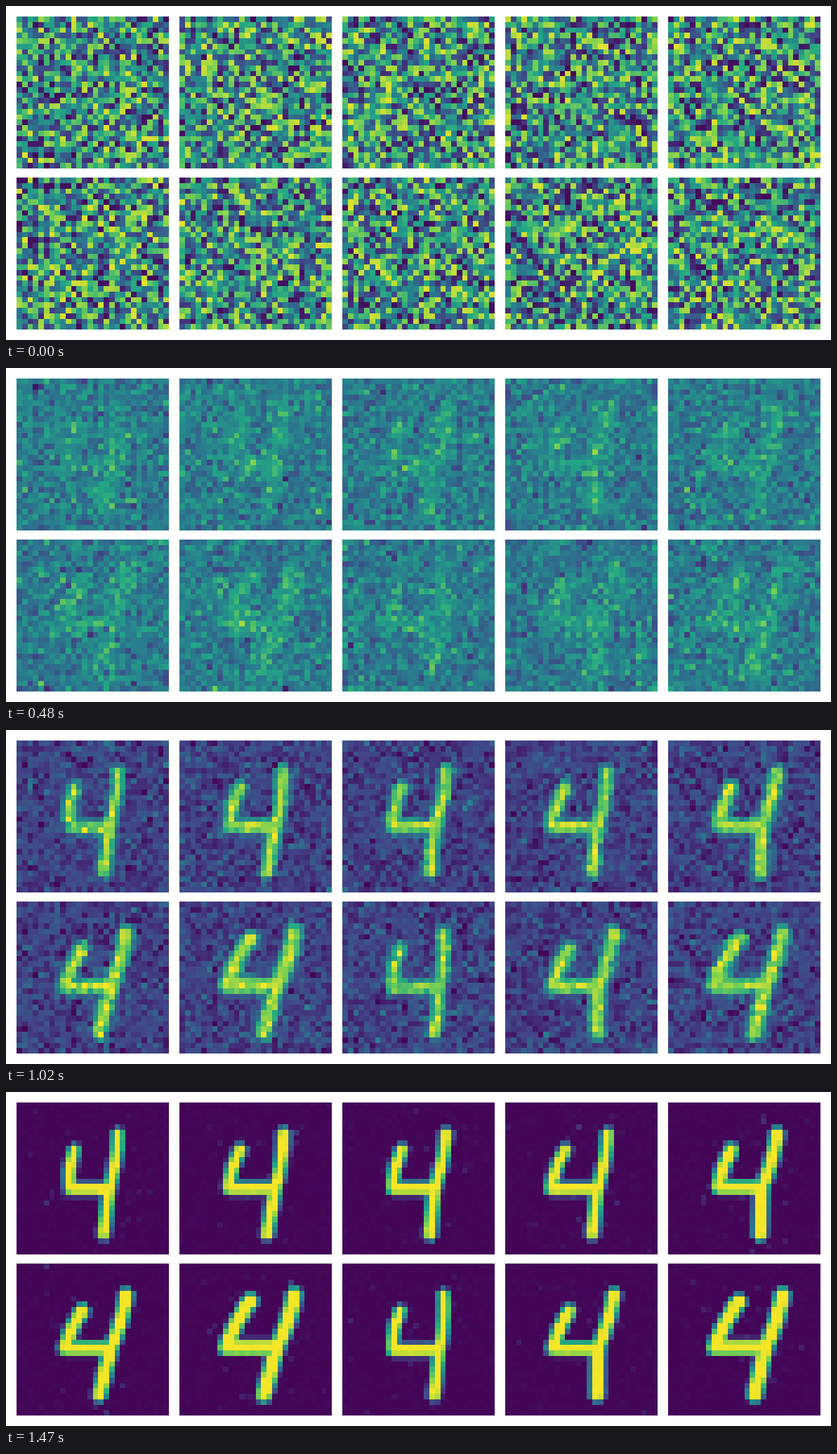
An HTML page with a canvas that plays this animation: 1175 by 477 pixels, repeating every 1.5 s.

```html
<!DOCTYPE html>
<html>
<head>
<meta charset="utf-8">
<style>
html, body { margin: 0; width: 100%; height: 100%; overflow: hidden; background: #fff; }
canvas { display: block; }
</style>
</head>
<body>
<canvas id="stage" width="1175" height="477"></canvas>
<script>
const N = 28, CELLS = N * N, STEPS = 50, STEP_MS = 30;
const ctx = document.getElementById('stage').getContext('2d');
ctx.imageSmoothingEnabled = false;

const tile = document.createElement('canvas');
tile.width = tile.height = N;
const tileCtx = tile.getContext('2d');
const pixels = tileCtx.createImageData(N, N);

const clamp = v => Math.max(0, Math.min(1, v));
const mix = (a, b, u) => a + (b - a) * u;
const mixPt = (p, q, u) => [mix(p[0], q[0], u), mix(p[1], q[1], u)];

// Viridis colour scale
const stops = ['440154', '414487', '2a788e', '22a884', '7ad151', 'fde725']
  .map(h => [0, 2, 4].map(i => parseInt(h.slice(i, i + 2), 16)));
function viridis(v) {
  const p = v * (stops.length - 1), k = Math.min(stops.length - 2, Math.floor(p));
  return stops[k].map((c, j) => Math.round(mix(c, stops[k + 1][j], p - k)));
}
const colors = Array.from({ length: 256 }, (_, i) => viridis(i / 255));

let seed = 20417;
function rand() {
  seed = (seed + 0x6D2B79F5) | 0;
  let t = Math.imul(seed ^ seed >>> 15, 1 | seed);
  t = t + Math.imul(t ^ t >>> 7, 61 | t) ^ t;
  return ((t ^ t >>> 14) >>> 0) / 4294967296;
}
const gauss = () => Math.sqrt(-2 * Math.log(1 - rand())) * Math.cos(2 * Math.PI * rand());

function segDist(x, y, [[ax, ay], [bx, by]]) {
  const dx = bx - ax, dy = by - ay;
  const u = clamp(((x - ax) * dx + (y - ay) * dy) / (dx * dx + dy * dy));
  return Math.hypot(x - ax - u * dx, y - ay - u * dy);
}

// Bowed stroke from p to q, its middle pushed sideways
function bow(p, q, push, parts = 6) {
  const point = u => {
    const [x, y] = mixPt(p, q, u);
    return [x + 4 * push * u * (1 - u), y];
  };
  return Array.from({ length: parts }, (_, i) => [point(i / parts), point((i + 1) / parts)]);
}

// Signed depth inside the strokes of a handwritten 4, for every cell;
// wider leaning ones are bolder and have a higher bar
function four([hook, corner, top, cross, foot]) {
  const lean = top - 18.7;
  const half = 1.12 + 0.13 * lean, bar = 15.9 - 0.2 * lean;
  const crossing = [cross, bar];
  const lines = [
    ...bow([hook, 8.8 - 2 * Math.max(0, hook - 12)], [corner, bar], -0.4),
    [[corner, bar], crossing],
    ...bow([top, 5.8], crossing, 0.35),
    [crossing, [foot, 24.1]]
  ];
  return Float32Array.from({ length: CELLS }, (_, i) => {
    const x = i % N + 0.5, y = Math.floor(i / N) + 0.5;
    return half - Math.min(...lines.map(l => segDist(x, y, l)));
  });
}

// Columns of hook, corner, stem top, crossing and foot
const fours = [
  [10.6, 9.9, 18.6, 17.0, 16.0],
  [11.1, 9.1, 19.1, 17.6, 16.1],
  [10.9, 9.3, 19.0, 16.9, 16.1],
  [11.0, 8.4, 18.8, 16.9, 16.0],
  [11.6, 9.3, 20.0, 17.2, 16.9],
  [12.0, 9.0, 20.1, 17.3, 15.2],
  [13.0, 8.6, 21.1, 17.9, 15.5],
  [10.6, 9.3, 18.6, 17.8, 16.9],
  [11.7, 8.9, 19.9, 17.0, 16.9],
  [12.9, 8.6, 21.0, 17.9, 15.9]
].map(four);

// Noise that drifts from step to step, starting uniform
const KEEP = 0.93, FRESH = Math.sqrt(1 - KEEP * KEEP);
const noise = [Float32Array.from({ length: CELLS * fours.length }, () => (rand() - 0.5) * 3.4)];
for (let k = 1; k < STEPS; k++)
  noise.push(noise[k - 1].map(v => KEEP * v + FRESH * gauss()));

function draw(k) {
  const u = k / (STEPS - 1), rest = Math.sqrt(1 - u * u);
  const ground = mix(0.015, 0.485, rest ** 3);
  const ink = mix(0.49, 0.985, Math.sin(u * Math.PI / 2) ** 2);
  const soft = 1.25 + 4.5 * (1 - u) ** 2;
  const sd = 0.004 + 0.096 * rest + 0.175 * Math.exp(-k / 2.5);
  const specks = 0.06 * clamp(5 * u - 4);
  ctx.fillStyle = '#fff';
  ctx.fillRect(0, 0, 1175, 477);
  fours.forEach((depth, n) => {
    for (let i = 0; i < CELLS; i++) {
      const z = noise[k][n * CELLS + i];
      const v = mix(ground, ink, clamp(0.5 + depth[i] / soft)) + z * sd
        + Math.max(0, z - (depth[i] > -3 ? 1.4 : 2)) * specks;
      pixels.data.set(colors[Math.round(clamp(v) * 255)], i * 4);
      pixels.data[i * 4 + 3] = 255;
    }
    tileCtx.putImageData(pixels, 0, 0);
    ctx.drawImage(tile, 15 + n % 5 * 232, n < 5 ? 15 : 245, 217, 217);
  });
}

let shown = -1;
function tick() {
  const k = Math.floor(performance.now() / STEP_MS) % STEPS;
  if (k !== shown) draw(shown = k);
  requestAnimationFrame(tick);
}
tick();
</script>
</body>
</html>
```
